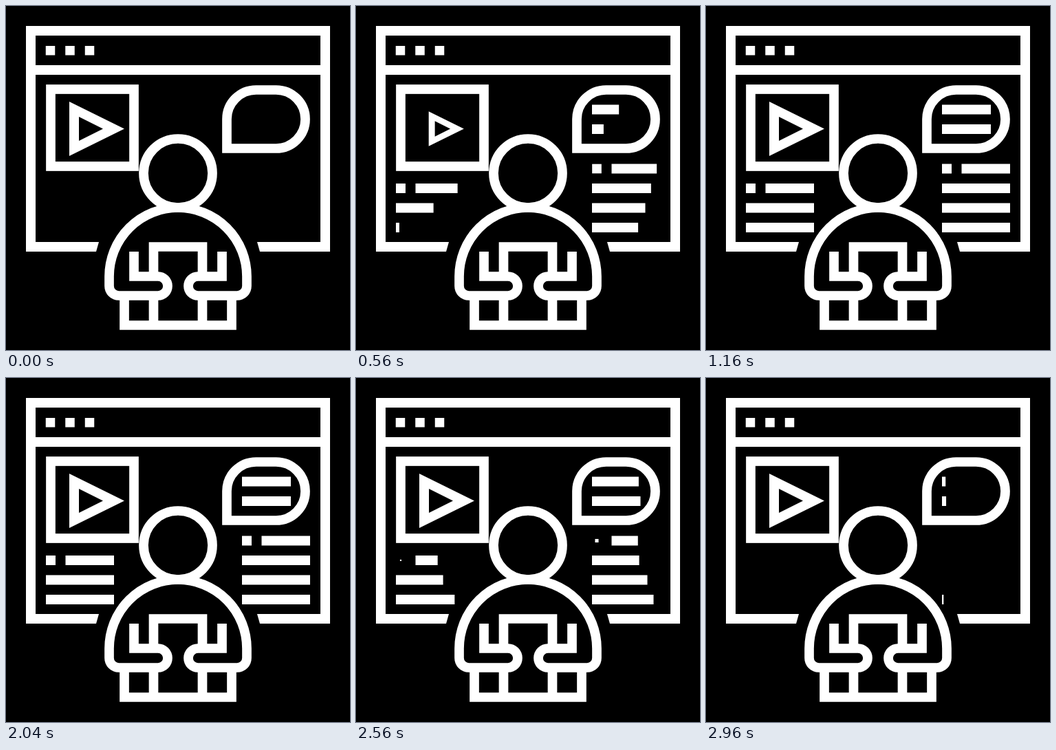
An HTML page that plays this animation: 500 by 500 pixels, repeating every 3000 ms.

```html
<!DOCTYPE html>
<html lang="en">
<head>
<meta charset="utf-8">
<style>
  html, body { margin: 0; height: 100%; overflow: hidden; background: #000; }
  svg { display: block; width: 100%; height: 100%; }
</style>
</head>
<body>
<svg viewBox="0 0 500 500" fill="#fff">
  <!-- browser window -->
  <path fill-rule="evenodd" d="M29 29H471V357H369L365 343H457V100H43V343H135L131 357H29ZM43 43V86H457V43Z"/>
  <path d="M64.5 58V71.500M93 58V71.500M121.500 58V71.500" stroke="#fff" stroke-width="13.500"/>
  <g fill="none" stroke="#fff" stroke-width="13.700">
    <rect x="65" y="121" width="121" height="112"/>
    <path d="M321 207V164.500A42.500 42.500 0 0 1 363.500 122H392.500A42.500 42.500 0 0 1 392.500 207Z"/>
    <!-- person with paper -->
    <circle cx="250" cy="243" r="50"/>
    <path d="M186 357V393H221a14 14 0 0 1 0 28H164a14 14 0 0 1-14-14V393A100 100 0 0 1 350 393V407a14 14 0 0 1-14 14H279a14 14 0 0 1 0-28H314V357"/>
    <path d="M214.500 388V350H285.500V388M172 424V464H328V424M214.500 424V464M285.500 424V464"/>
  </g>
  <path id="play" fill-rule="evenodd" d="M92 139L172 178.500L92 218ZM106 161V196L141 178.500Z"/>
  <g id="bars"></g>
</svg>
<script>
const LOOP = 3000, STEP = 40, PULSE = 840;
const GROW = 590, ENTER = 65, ENTER_SLOT = 60;
const EXIT = 2017, EXIT_SLOT = 36, EXIT_END = 2980;
const SIZE = 14, PITCH = 28.5;
const play = document.getElementById('play');
const group = document.getElementById('bars');
const bars = [];

function addBar(x, y, width, enterSlot, exitSlot) {
  const rect = document.createElementNS('http://www.w3.org/2000/svg', 'rect');
  group.append(rect);
  const enter = ENTER + ENTER_SLOT * enterSlot;
  const exit = EXIT + EXIT_SLOT * exitSlot;
  bars.push({ rect, x, y, width, enter, exit });
}

// a bullet with its heading, then full lines below
function addText(x, y, lines, enterSlot, enterStep, exitSlot, exitStep) {
  for (let i = 0; i <= lines; i++) {
    const left = i === 1 ? x + PITCH : x;
    const width = i === 0 ? SIZE : x + 99 - left;
    const top = y + PITCH * Math.max(0, i - 1);
    addBar(left, top, width, enterSlot + enterStep * i, exitSlot + exitStep * i);
  }
}

addText(58, 258, 3, -1, 3, 0, 3);
addText(343, 229.5, 4, 0, 1, 2, 2);
for (let i = 0; i < 2; i++) addBar(343, 143.5 + PITCH * i, 71, 5 + 2 * i, 12 + 2 * i);

const clamp = u => Math.min(1, Math.max(0, u));

function drawBar({ rect, x, y, width, enter, exit }, t) {
  const grown = 1 - (1 - clamp((t - enter) / GROW)) ** 2;
  const gone = clamp((t - exit) / Math.min(GROW, EXIT_END - exit)) ** 2;
  const k = grown - gone;
  // bullets grow from their centre, lines from the left
  const bullet = width === SIZE;
  const inset = bullet ? SIZE * (1 - k) / 2 : 0;
  rect.setAttribute('x', x + inset);
  rect.setAttribute('y', y + inset);
  rect.setAttribute('width', width * k);
  rect.setAttribute('height', SIZE - 2 * inset);
}

function draw(t) {
  for (const bar of bars) drawBar(bar, t);
  const scale = 1 - 0.48 * Math.sin(Math.PI * clamp(t / PULSE)) ** 2;
  play.setAttribute('transform', `translate(130 178.5) scale(${scale}) translate(-130 -178.5)`);
}

const start = performance.now();
function frame() {
  const t = (performance.now() - start) % LOOP;
  draw(Math.floor(t / STEP) * STEP);
  requestAnimationFrame(frame);
}
frame();
</script>
</body>
</html>
```
